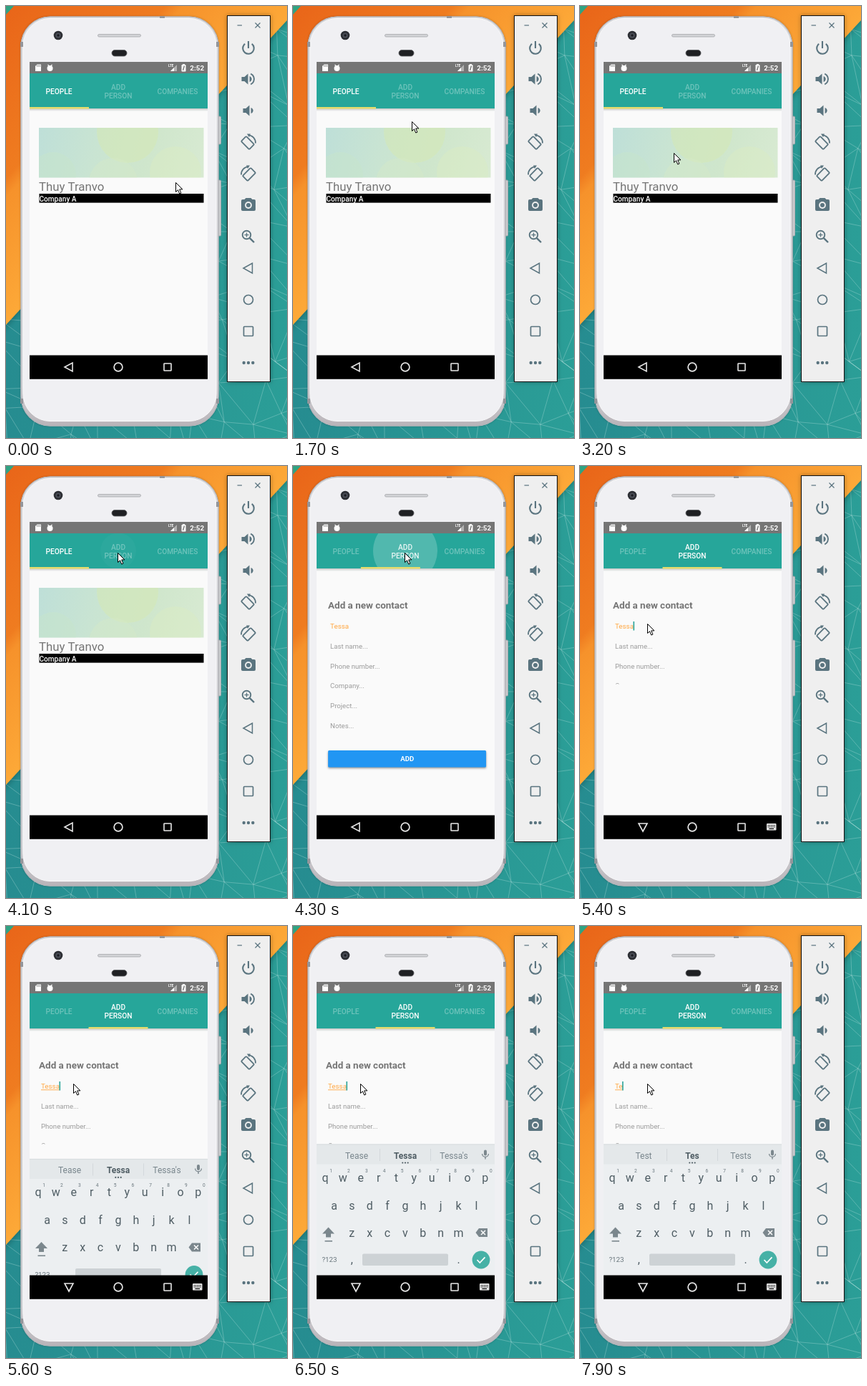
An HTML page with a canvas that plays this animation: 393 by 603 pixels, repeating every 8 s.

```html
<!DOCTYPE html>
<html lang="en">
<head>
<meta charset="utf-8">
<title>Contacts app in a phone emulator</title>
<style>
html, body { margin: 0; width: 100%; height: 100%; overflow: hidden; background: #29998f; }
canvas { display: block; width: 393px; height: 603px; }
</style>
</head>
<body>
<canvas id="stage"></canvas>
<script>
const W = 393, H = 603, LOOP = 8000, STEP = 100;
const canvas = document.getElementById('stage');
const dpr = window.devicePixelRatio || 1;
canvas.width = W * dpr;
canvas.height = H * dpr;
const c = canvas.getContext('2d');

const FONT = 'Roboto, "Open Sans", sans-serif';
const TEAL = '#26a69a', PAPER = '#fafafa', SLATE = '#5a747f', KEY = '#4f5d64';

// ---------- helpers ----------
function paint(fill, stroke, lw = 1) {
  if (fill) { c.fillStyle = fill; c.fill(); }
  if (stroke) { c.strokeStyle = stroke; c.lineWidth = lw; c.stroke(); }
}
function rect(x, y, w, h, fill) {
  c.fillStyle = fill;
  c.fillRect(x, y, w, h);
}
function round(x, y, w, h, r, fill, stroke, lw) {
  c.beginPath();
  c.roundRect(x, y, w, h, r);
  paint(fill, stroke, lw);
}
function arc(x, y, r, a, b, stroke, lw) {
  c.beginPath();
  c.arc(x, y, r, a, b);
  paint(null, stroke, lw);
}
function disc(x, y, r, fill, a = 0, b = 7) {
  c.beginPath();
  c.arc(x, y, r, a, b);
  paint(fill);
}
function poly(pts, fill, stroke, lw, close = true) {
  c.beginPath();
  pts.forEach(p => c.lineTo(...p));
  if (close) c.closePath();
  paint(fill, stroke, lw);
}
const line = (x1, y1, x2, y2, stroke, lw) =>
  poly([[x1, y1], [x2, y2]], null, stroke, lw, false);
function text(s, x, y, size, fill, weight = 400, align = 'left') {
  c.font = `${weight} ${size}px ${FONT}`;
  c.textAlign = align;
  c.fillStyle = fill;
  c.fillText(s, x, y);
}
function grad(x1, y1, x2, y2, ...stops) {
  const g = c.createLinearGradient(x1, y1, x2, y2);
  stops.forEach(([p, col]) => g.addColorStop(p, col));
  return g;
}
function at(x, y, draw, turn = 0) {
  c.save();
  c.translate(x, y);
  c.rotate(turn);
  draw();
  c.restore();
}
function clipped(x, y, w, h, draw) {
  c.save();
  c.beginPath();
  c.rect(x, y, w, h);
  c.clip();
  draw();
  c.restore();
}
function shadowed(color, blur, dy, draw) {
  c.save();
  c.shadowColor = color;
  c.shadowBlur = blur * dpr;
  c.shadowOffsetY = dy * dpr;
  draw();
  c.restore();
}
const span = (t, from, to) => Math.min(1, Math.max(0, (t - from) / (to - from)));
const easeOut = (p, n) => 1 - (1 - p) ** n;
function random(seed) {
  return () => (seed = seed * 16807 % 2147483647) / 2147483647;
}

// ---------- desktop ----------
function mesh() {
  const rnd = random(41), gap = 44, cols = 11, rows = 16;
  const pts = Array.from({ length: cols * rows }, (_, i) => [
    (i % cols - .5 + rnd() * .8) * gap, (Math.floor(i / cols) - .5 + rnd() * .8) * gap]);
  pts.forEach((p, i) => {
    if (i % cols === cols - 1) return;
    [1, cols, cols + 1].forEach(step => {
      const q = pts[i + step];
      if (q) line(...p, ...q, 'rgba(205,235,232,.3)', 1);
    });
  });
}

function wallpaper() {
  rect(0, 0, W, H, grad(0, 400, 393, 400, [0, '#268c90'], [1, '#2b9e97']));
  mesh();
  shadowed('rgba(0,40,40,.35)', 9, 2, () =>
    poly([[-20, -20], [430, -20], [0, 445], [-20, 467]],
      grad(0, 0, 222, 206, [0, '#e96519'], [.54, '#ef7c20'], [.6, '#f6922b'], [1, '#fda938'])));
  poly([[0, 0], [11, 0], [0, 12]], '#2fa383');
}

function phone() {
  const mark = '#94969b';
  [[154, 39], [243, 78]].forEach(([y, h]) => round(297, y, 3.5, h, 1.5, '#d4d5d8', '#a9abb0'));
  shadowed('rgba(0,0,0,.25)', 3, 0, () => round(20.5, 14.5, 277, 572, 41, '#c3c1c6'));
  round(21, 15, 276, 571, 41, grad(0, 15, 0, 586, [0, '#dcdde0'], [.9, '#d2d2d6'], [1, '#b9b4b9']), '#b2b3b8');
  round(24, 17.5, 270, 562, 38, '#f0f0f3', '#fafafb');
  [50, 548].forEach(y => [20, 294].forEach(x => rect(x, y, 4, 7, mark)));
  rect(215, 14, 7, 3, mark);
  disc(73, 41, 6.3, '#2c2e33');
  disc(73, 41, 3.6, '#4b4e57');
  disc(73, 41, 1.7, '#1a1b20');
  round(128.5, 39.5, 60, 3.5, 1.7, '#d2d3d6', '#a6a7ab', .8);
  round(148, 61.5, 21, 8.5, 4.2, '#1f2023', '#55565a', .8);
}

function rotateIcon(y, dir) {
  at(339, y, () => {
    c.scale(dir, 1);
    at(-1, 1, () => round(-5, -8, 10, 16, 1.2, null, SLATE, 1.8), -Math.PI / 4);
    arc(-1, 1, 11, -1.5, .05, SLATE, 1.8);
    poly([[-2, -11.5], [3, -11.5], [1, -7]], SLATE);
  });
}
function speakerIcon(x, y, wave) {
  poly([[x, y - 3], [x + 4, y - 3], [x + 9, y - 7.5], [x + 9, y + 7.5], [x + 4, y + 3], [x, y + 3]], SLATE);
  disc(x + 10, y, 4.2, SLATE, -1.3, 1.3);
  if (wave) arc(x + 9.5, y, 8, -1.15, 1.15, SLATE, 1.9);
}
function cross(x, y, r, stroke, lw) {
  line(x - r, y - r, x + r, y + r, stroke, lw);
  line(x + r, y - r, x - r, y + r, stroke, lw);
}

function panel() {
  shadowed('rgba(0,0,0,.35)', 6, 0, () => rect(309, 13, 61, 512, '#efefef'));
  c.strokeStyle = '#111';
  c.lineWidth = 1;
  c.strokeRect(309.5, 13.5, 60, 511);
  line(323.5, 27, 330, 27, SLATE, 1.2);
  cross(352, 27, 3.5, SLATE, 1.2);

  arc(339, 59, 7.8, -.9, Math.PI + .9, SLATE, 2.1);
  line(339, 49, 339, 59, SLATE, 2.1);
  speakerIcon(329.5, 102, true);
  speakerIcon(331.5, 146, false);
  rotateIcon(190, 1);
  rotateIcon(234, -1);

  round(329, 270, 20, 16, 2, SLATE);
  poly([[333, 270.5], [335.5, 268], [342.5, 268], [345, 270.5]], SLATE);
  disc(339, 278, 4.9, '#efefef');
  disc(339, 278, 3, SLATE);

  arc(336.5, 319.5, 5.8, 0, 7, SLATE, 1.9);
  line(340.8, 323.8, 347, 330, SLATE, 2.4);
  line(333.5, 319.5, 339.5, 319.5, SLATE, 1.3);
  line(336.5, 316.5, 336.5, 322.5, SLATE, 1.3);

  poly([[332, 366], [344.5, 359], [344.5, 373]], null, SLATE, 1.5);
  arc(339, 410, 6.5, 0, 7, SLATE, 1.7);
  round(332.5, 447.5, 13, 13, 1, null, SLATE, 1.7);
  for (let i = -1; i < 2; i++) disc(339 + i * 6.3, 498, 2.2, SLATE);
}

// ---------- app chrome ----------
function statusBar() {
  const grey = '#757575';
  rect(33, 78, 249, 16, grey);
  poly([[41, 84], [43.5, 81.5], [49, 81.5], [49, 91], [41, 91]], '#fff');
  for (let x = 43; x < 48; x += 2) rect(x, 82.5, .9, 2.2, grey);
  disc(61.5, 87, 4, '#fff');
  cross(61.5, 85, 3, '#fff', 1.2);
  text('LTE', 227, 85, 4.5, '#fff', 700);
  poly([[239, 82], [239, 91], [230, 91]], 'rgba(255,255,255,.45)');
  poly([[235, 86], [235, 91], [230, 91]], '#fff');
  round(245.5, 82, 6, 9.5, .8, '#fff');
  rect(247, 81, 3, 1.5, '#fff');
  line(249.4, 83.5, 247.6, 89.8, grey, 1.4);
  text('2:52', 277, 90, 9.8, '#fff', 700, 'right');
}

function tabBar(t) {
  rect(33, 143, 249, 4, grad(0, 143, 0, 147, [0, 'rgba(0,0,0,.2)'], [1, 'rgba(0,0,0,0)']));
  rect(33, 94, 249, 49, TEAL);
  const glow = .2 * Math.min(span(t, 4070, 4300), 1 - span(t, 4300, 4800));
  if (glow > 0) clipped(33, 94, 249, 49, () =>
    disc(157, 118.5, 45 * easeOut(span(t, 4000, 4300), 2), `rgba(255,255,255,${glow})`));

  const on = span(t, 4100, 4350);
  const label = (s, x, y, p) =>
    text(s, x, y, 10.2, `rgba(255,255,255,${.33 + .67 * p})`, 500, 'center');
  label('PEOPLE', 74, 122.5, Math.max(0, 1 - on * 1.3));
  label('ADD', 157, 116.5, on);
  label('PERSON', 157, 128.5, on);
  label('COMPANIES', 240, 122.5, 0);
  rect(33 + 82.5 * easeOut(span(t, 4100, 4500), 2), 141, 83, 2.5, '#e6dc6b');
}

function navBar(typing) {
  const ink = '#e6e6e6';
  rect(33, 487.5, 249, 33.3, '#000');
  at(88, 504, () => poly([[-6, 0], [5, -6], [5, 6]], null, ink, 1.6), typing ? -Math.PI / 2 : 0);
  arc(157, 504, 5.9, 0, 7, ink, 1.7);
  round(221, 499, 10, 10, .6, null, ink, 1.6);
  if (!typing) return;
  round(261, 499, 13.5, 9.5, 1, ink);
  for (let i = 0; i < 10; i++) rect(262.6 + i % 5 * 2.2, 501 + (i > 4) * 2.2, 1.2, 1.2, '#000');
  rect(264.5, 505.8, 6.5, 1.2, '#000');
}

// ---------- pages ----------
function peoplePage() {
  clipped(46, 170, 230.5, 69.5, () => {
    rect(46, 170, 231, 70, grad(46, 170, 277, 240,
      [0, '#bedfd8'], [.35, '#c9e4d2'], [.65, '#cfe6cc'], [1, '#d8ead2']));
    disc(170, 176, 43, 'rgba(214,233,180,.55)');
    disc(237, 232, 36, 'rgba(218,236,192,.45)');
    disc(150, 246, 34, 'rgba(212,233,198,.4)');
    disc(66, 236, 32, 'rgba(200,230,204,.5)');
  });
  text('Thuy Tranvo', 46, 257.5, 16.8, '#757575');
  rect(46.5, 262, 230, 12.6, '#000');
  text('Company A', 46.5, 272.6, 10.1, '#fff', 500);
}

function addPage(name, caret, composing) {
  text('Add a new contact', 46, 199, 13.45, '#757575', 700);
  text(name, 49, 227, 9.8, '#ffa742');
  const end = 49 + c.measureText(name).width;
  if (composing) rect(49, 228.3, end - 49, .9, '#ffa742');
  if (caret) rect(end - .6, 217, 1.7, 12.5, '#35a89d');
  ['Last name...', 'Phone number...', 'Company...', 'Project...', 'Notes...']
    .forEach((s, i) => text(s, 49, 254.8 + i * 27.7, 9.65, '#9b9b9b'));
  shadowed('rgba(0,0,0,.4)', 3, 1.5, () => round(46, 397, 221, 23.5, 1.5, '#2196f3'));
  text('ADD', 156.7, 412.3, 9.6, '#fff', 700, 'center');
}

// ---------- keyboard ----------
function keyboard(words) {
  const soft = '#7b878d', dim = '#68757c';
  rect(33, 304.5, 249, 184, '#eceff1');
  rect(33, 304.5, 249, 28, '#e4e8ea');
  rect(33, 304.5, 249, 1, '#d9dddf');
  [121, 192].forEach(x => rect(x, 311, 1, 17, '#d3d8db'));
  words.forEach((w, i) =>
    text(w, 89 + i * 68, 324.5, 12, i === 1 ? KEY : '#78858c', i === 1 ? 700 : 400, 'center'));
  for (let i = -1; i < 2; i++) disc(157 + i * 3.7, 330.5, 1.1, KEY);
  round(267, 312.5, 4, 8, 2, soft);
  arc(269, 318, 4.4, 0, Math.PI, soft, 1.3);
  line(269, 322, 269, 325.5, soft, 1.4);

  const row = (keys, x, y, size = 16, fill = KEY) => [...keys].forEach((k, i) =>
    text(k, x + i * 24.87, y, size, fill, 400, 'center'));
  row('1234567890', 53, 343.5, 6.6, dim);
  row('qwertyuiop', 45, 357);
  row('asdfghjkl', 57.5, 395.5);
  row('zxcvbnm', 82.3, 433.5);

  poly([[49.5, 420.5], [58, 429.5], [41, 429.5]], soft);
  rect(46, 429, 7, 5.5, soft);
  rect(44.5, 439, 10.5, 1.6, soft);
  poly([[255.5, 428], [260, 422], [272, 422], [272, 434], [260, 434]], soft);
  cross(266, 428, 3, '#fff', 1.5);

  text('?123', 51, 469.3, 9.8, dim, 400, 'center');
  row(',', 82.3, 470.5);
  row('.', 231.5, 470.5);
  round(97, 457.5, 120, 16.5, 2, '#cdd2d5');
  disc(263, 466, 12.4, '#46b1a6');
  poly([[257.5, 466], [261.3, 470], [268.5, 462.3]], null, '#fff', 1.7, false);
}

// ---------- pointer ----------
// Each move is one Bezier curve over a span of time
const MOVES = [
  { from: 900, to: 1700, pts: [[237, 246], [150, 235], [100, 185], [166, 161]] },
  { from: 1700, to: 2400, pts: [[166, 161], [110, 105], [90, 185], [127, 199]] },
  { from: 3100, to: 3900, pts: [[127, 199], [135, 220], [160, 190], [156, 121]] },
  { from: 4400, to: 4900, pts: [[156, 121], [150, 130], [105, 205], [94, 220]] }
];
function pointer(t) {
  const { from, to, pts } = MOVES.findLast(m => t >= m.from) || MOVES[0];
  const p = span(t, from, to), q = 1 - p;
  const [x, y] = [0, 1].map(k => Math.round(
    q ** 3 * pts[0][k] + 3 * q * q * p * pts[1][k] + 3 * q * p * p * pts[2][k] + p ** 3 * pts[3][k]));
  at(x + .5, y + .5, () =>
    poly([[0, 0], [0, 13], [3, 10.2], [5.2, 15.5], [7.4, 14.6], [5.2, 9.4], [9.4, 9.4]],
      '#fff', '#000', 1));
}

// ---------- scene ----------
const typed = t => 'Tessa'.slice(0, t < 7500 ? 5 : t < 7700 ? 4 : t < 7900 ? 3 : 2);
const hints = t => t < 7600 ? ['Tease', 'Tessa', "Tessa's"]
  : t < 7900 ? ['Tease', 'Tess', 'Tessa'] : ['Test', 'Tes', 'Tests'];
const caretOn = t => (t >= 5000 && t < 6000) || (t >= 6500 && t < 6900) || t >= 7500;

function draw(t) {
  c.setTransform(dpr, 0, 0, dpr, 0, 0);
  wallpaper();
  phone();
  panel();
  rect(33, 78, 249, 443, PAPER);
  const page = easeOut(span(t, 4100, 4400), 4);
  const bottom = t >= 5300 ? 304.5 : 488;
  clipped(33, 143, 249, bottom - 143, () => {
    if (page < 1) at(-249 * page, 0, peoplePage);
    if (page > 0) at(249 * (1 - page), 0, () => addPage(typed(t), caretOn(t), t >= 5600));
  });
  const rise = easeOut(span(t, 5400, 5700), 2);
  if (rise > 0) clipped(33, 304, 249, 184, () =>
    at(0, 184 * (1 - rise), () => keyboard(hints(t))));
  statusBar();
  tabBar(t);
  navBar(t >= 5200);
  pointer(t);
}

const start = performance.now();
function tick(now) {
  const t = Math.max(0, now - start) % LOOP;
  draw(Math.floor(t / STEP) * STEP);
  requestAnimationFrame(tick);
}
draw(0);
requestAnimationFrame(tick);
</script>
</body>
</html>
```
